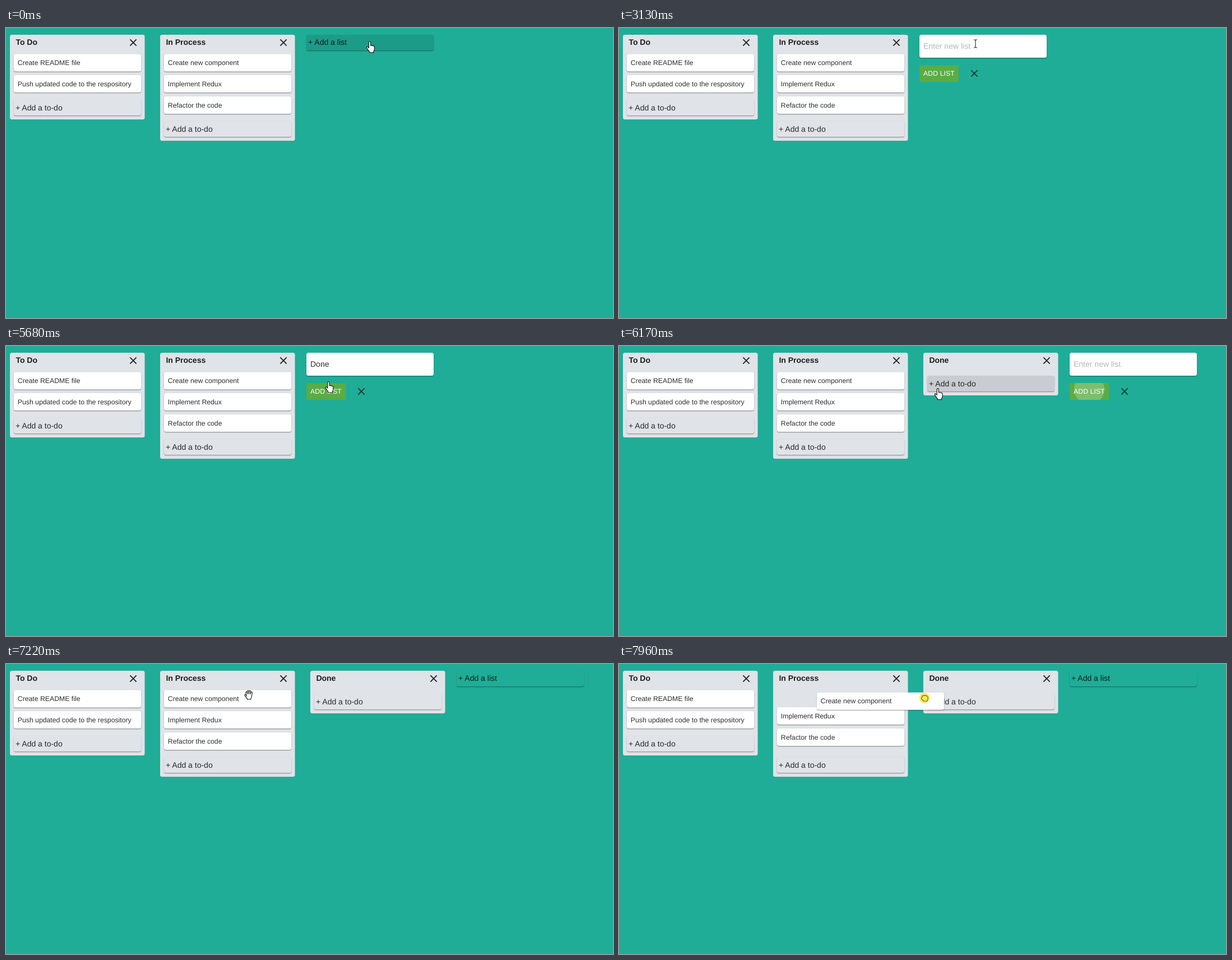
Animation of 1083x517 px, one loop 8 s. Source, as an HTML page:

```html
<!DOCTYPE html>
<html lang="en">
<head>
<meta charset="utf-8">
<title>Task board</title>
<style>
  html, body { margin: 0; width: 100%; height: 100%; overflow: hidden; background: #1fad97; }
  svg { display: block; }
  text { font: 14px Arial, "Liberation Sans", sans-serif; fill: #000; fill-opacity: .82; text-rendering: geometricPrecision; white-space: pre; }
  .title { font-weight: bold; fill-opacity: .88; }
  .small { font-size: 12.25px; }
  .hint { fill: #b3b6b7; fill-opacity: 1; }
  .white { fill: #fff; fill-opacity: 1; }
  .cross { stroke: #000; stroke-width: 1.8; fill: none; }
  #cursor path { stroke: #111; stroke-width: 1.1; stroke-linejoin: round; fill: #fff; }
  #cursor .ibeam { fill: none; stroke: #333; stroke-width: 1.2; }
  #cursor .fist { fill: #fbe95c; stroke: #6b5a10; }
</style>
</head>
<body>
<svg id="stage" width="1083" height="517" viewBox="0 0 1083 517"></svg>
<script>
const LOOP = 8000, PITCH = 268;
const TEAL = '#1fad97', LIST = '#e0e3e8', GREEN = '#5aac44';

const rect = (x, y, w, h, fill, more = '') =>
  `<rect x="${x}" y="${y}" width="${w}" height="${h}" rx="3.5" fill="${fill}" ${more}/>`;
const label = (x, y, str, cls = '', more = '') =>
  `<text x="${x}" y="${y}" class="${cls}" ${more}>${str}</text>`;
const raised = (x, y, w, h, fill) =>
  rect(x, y + 1, w, h, '#000', 'opacity=".22" filter="url(#soft)"') +
  rect(x, y + 1, w, h, '#000', 'opacity=".24"') + rect(x, y, w, h, fill);
const cross = (x, y, alpha) =>
  `<path class="cross" stroke-opacity="${alpha}" d="M${x - 5.6} ${y - 5.6}l11.2 11.2m0-11.2l-11.2 11.2"/>`;
const group = (id, inner, more = '') => `<g id="${id}" ${more}>${inner}</g>`;
const card = (x, y, str) => raised(x, y, 227, 31, '#fff') + label(x + 6.8, y + 19.6, str, 'small');

// Column frame with heading, close mark and add button
function column(i, name, bottom, hoverId = '') {
  const x = 7 + PITCH * i;
  const hover = hoverId ? rect(x + 7, bottom - 35, 227, 28, '#000', `id="${hoverId}" opacity=".1"`) : '';
  return rect(x, 12, 240.5, bottom - 12, LIST) +
    label(x + 10.4, 30, name, 'title') + cross(x + 220, 26, .87) +
    raised(x + 7, bottom - 35, 227, 28, LIST) + hover +
    label(x + 10, bottom - 16, '+ Add a to-do');
}

const shapes = {
  hand: 'M-1.6 11.5V1.3a1.55 1.5 0 0 1 3.1 0V7q1.4-.9 2.6.4 1.5-.7 2.4.6 1.8-.4 1.8 1.6v4q0 2-1.5 4v2h-7.4v-1.6q-3-4-4.8-7-.5-1.6 1-1.7 1.2 0 2.8 2.2z',
  ibeam: 'M-3-7h2l1 1 1-1h2M0-6V6M-3 7h2l1-1 1 1h2',
  arrow: 'M0 0V15l3.4-3.2 2.3 5.4 2.4-1-2.3-5.3h4.7z',
  grab: 'M-3.8 2.5L-5.2-4q0-1.6 1.2-1.5 1 .1 1.3 1.4l.7 2.6-.5-4.7q.1-1.5 1.2-1.5 1.1 0 1.3 1.4l.4 4.4.5-4.5q.3-1.4 1.4-1.3 1.2.2 1.1 1.6l-.3 4.8.8-3q.6-1.2 1.6-.9 1 .4.8 1.7L5.3 3q-.4 2.3-1.4 3.5V8h-6.5V6.8q-2-2-3.8-4.7-1.3-2-.2-2.7 1-.5 2.8 1.9z',
  fist: 'M-4-1q-.4-2.8 1.4-2.9 1-.2 1.5.5.6-1.2 1.8-1 1 .1 1.4.9.9-.7 1.8-.2.7.4.7 1.2 1.2-.2 1.5 1.2V2q0 2-1.5 3.5V6h-6.3V5.2Q-4.4 4-5.6 1.2-6-.8-4-1z'
};
const lift = { hand: -1.3 };

const stage = document.getElementById('stage');
stage.innerHTML =
  `<defs><filter id="soft" x="-5%" y="-30%" width="110%" height="160%"><feGaussianBlur stdDeviation="1"/></filter>
   <clipPath id="face"><rect x="536" y="66" width="70" height="30" rx="1.5"/></clipPath></defs>` +
  rect(-5, -5, 1093, 527, TEAL) +
  column(0, 'To Do', 163) + card(14, 46.5, 'Create README file') + card(14, 84, 'Push updated code to the respository') +
  column(1, 'In Process', 201) +
  group('rest', card(282, 84, 'Implement Redux') + card(282, 122, 'Refactor the code')) +
  group('done', column(2, 'Done', 88, 'hoverTodo')) +
  group('adder',
    group('closed', raised(536, 12, 227, 28, TEAL) +
      rect(536, 12, 227, 28, '#000', 'id="hoverList" opacity=".1"') + label(539, 30, '+ Add a list')) +
    group('form', raised(536, 12, 227, 41, '#fff') +
      label(543, 37, 'Enter new list', 'hint', 'id="hint"') + label(543, 37, '', '', 'id="typed"') +
      '<rect id="caret" y="25" width="1" height="15" fill="#222"/>' +
      `<rect x="536" y="66" width="70" height="30" rx="1.5" fill="${GREEN}"/>` +
      '<g clip-path="url(#face)"><circle id="ripple" cx="571" cy="77" fill="#fff" opacity=".22"/></g>' +
      label(543, 85.3, 'ADD LIST', 'small white', 'letter-spacing=".1"') + cross(634, 81, .68))) +
  group('drag', card(282, 46.5, 'Create new component')) +
  group('cursor', '<circle id="glow" r="9.3" fill="#ffe94a" opacity=".88"/>' +
    Object.entries(shapes).map(([k, d]) =>
      `<path id="${k}" class="${k}" d="${d}" transform="translate(0 ${lift[k] || 0})"/>`).join(''));

const el = {};
stage.querySelectorAll('[id]').forEach(n => el[n.id] = n);

// time, x, y, pointer kind from that time on
const path = [
  [0, 649, 25.5, 'hand'], [200, 649, 25.5, 'ibeam'], [3129, 649, 25.5, 'ibeam'],
  [3130, 636, 28, 'ibeam'], [3340, 608.5, 30.5, 'ibeam'], [3539, 608.5, 30.5, 'ibeam'],
  [3540, 613.5, 27.5, 'ibeam'], [3739, 613.5, 27.5, 'ibeam'], [3740, 599, 32.5, 'ibeam'],
  [4070, 599, 32.5, 'none'], [5259, 635.5, 31.5, 'none'], [5260, 635.5, 31.5, 'ibeam'],
  [5540, 590, 56, 'arrow'], [5680, 575.5, 65, 'hand'], [5960, 570.5, 77.3, 'hand'],
  [6400, 567, 77, 'hand'], [6520, 545, 75, 'arrow'], [6660, 507, 71, 'grab'],
  [6870, 469, 66, 'grab'], [7220, 433, 55, 'grab'], [7360, 423, 53, 'grab'],
  [7500, 469, 56, 'grab'], [7680, 469, 56, 'fist'], [7750, 474, 56, 'fist'],
  [7820, 480, 56, 'fist'], [7890, 508, 57.5, 'fist'], [7960, 545, 60.3, 'fist']
];
const keys = [[4070, 'D'], [4400, 'Do'], [4600, 'Don'], [4730, 'Done']];

// The pointer is sampled every 70 ms, restarting at each burst of movement
function sample(t) {
  if (t >= 3130 && t < 3410) return 3130 + Math.floor((t - 3130) / 70) * 70;
  if (t >= 7690) return 7680 + Math.floor((t - 7680) / 70) * 70;
  if (t >= 5260) return 5260 + Math.floor((t - 5260) / 70) * 70;
  return t;
}

function pointer(t) {
  let i = path.length - 1;
  while (path[i][0] > t) i--;
  const a = path[i], b = path[i + 1] || a;
  const p = b === a ? 0 : (t - a[0]) / (b[0] - a[0]);
  return { x: a[1] + (b[1] - a[1]) * p, y: a[2] + (b[2] - a[2]) * p, kind: a[3] };
}

const show = (node, on) => node.setAttribute('display', on ? 'inline' : 'none');
const move = (node, x, y) => node.setAttribute('transform', `translate(${x} ${y})`);
const between = (t, a, b) => t >= a && t < b;

function draw(t) {
  const s = sample(t), c = pointer(s);
  const added = t >= 6100, open = between(t, 200, 6310);

  show(el.done, added);
  move(el.adder, added ? PITCH : 0, 0);
  show(el.form, open);
  show(el.closed, !open);
  show(el.hoverList, t < 200);
  show(el.hoverTodo, c.kind === 'hand');

  const word = added ? '' : keys.reduce((w, k) => t >= k[0] ? k[1] : w, '');
  if (el.typed.textContent !== word) el.typed.textContent = word;
  show(el.hint, !word);
  show(el.caret, between(t, 3540, 4730));
  el.caret.setAttribute('x', word ? 545.2 + 7.8 * word.length | 0 : 543);

  el.ripple.setAttribute('r', t < 6030 ? 0 : Math.min(38, 11 + (s - 6030) * 16 / 140));

  const held = t >= 7750;
  move(el.drag, held ? c.x - 474 : 0, held ? c.y - 56 : 0);
  move(el.rest, 0, s >= 7960 ? -7 : s >= 7890 ? -2 : 0);

  move(el.cursor, c.x, c.y);
  for (const k in shapes) show(el[k], k === c.kind);
  show(el.glow, between(t, 60, 330) || between(t, 5960, 6100) || t >= 7690);
}

function tick(now) {
  draw(now % LOOP);
  requestAnimationFrame(tick);
}
draw(0);
requestAnimationFrame(tick);
</script>
</body>
</html>
```
